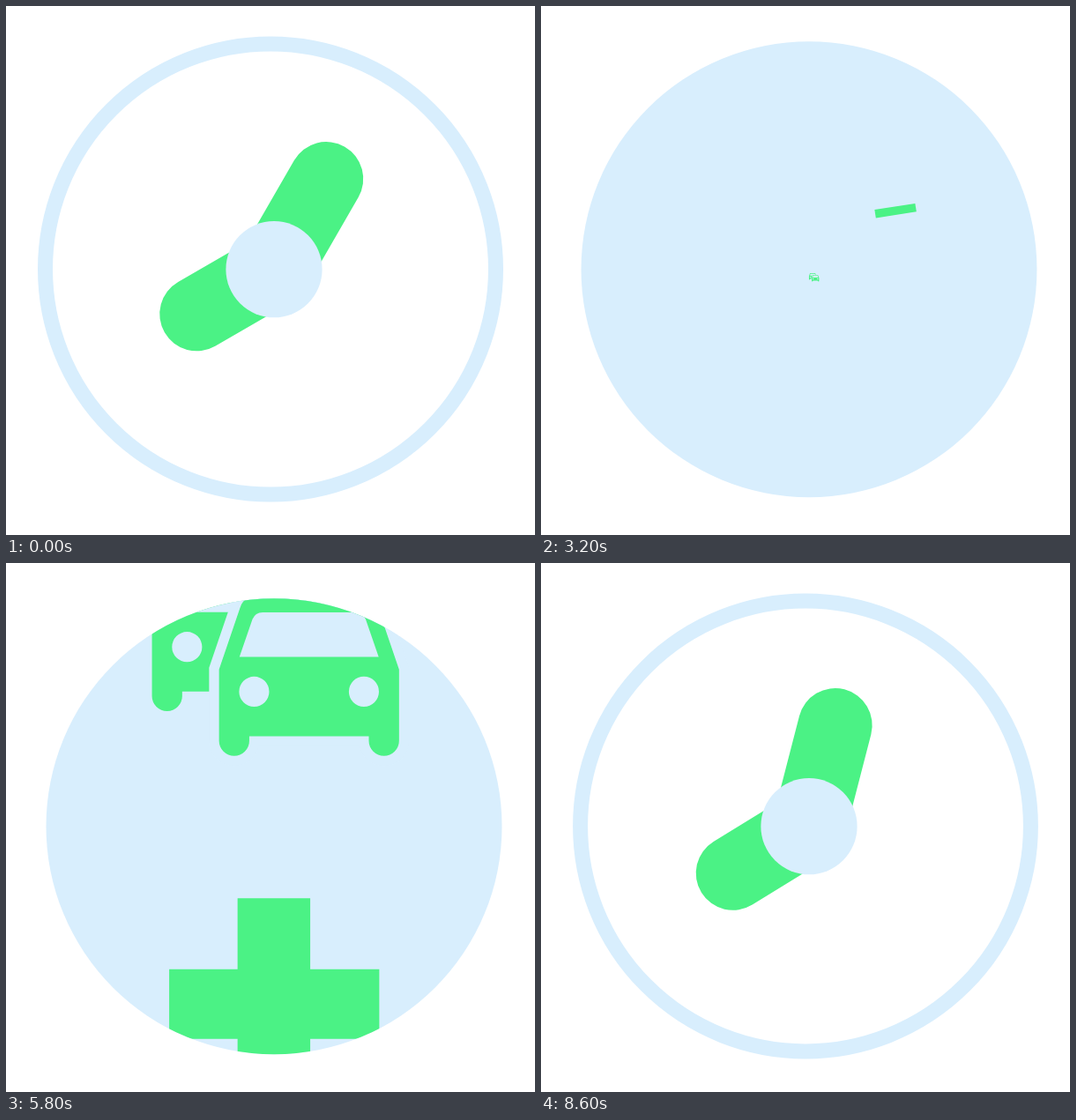
An HTML page with a canvas that plays this animation: 600 px wide and 600 px high, repeating every 8.7 s.

```html
<!DOCTYPE html>
<html lang="en">
<head>
<meta charset="utf-8">
<title>Clock, pulse, cars, cross</title>
<style>
  html, body { margin: 0; height: 100%; overflow: hidden; background: #fff; }
  canvas { display: block; width: 100vw; height: 100vh; }
</style>
</head>
<body>
<canvas width="600" height="600"></canvas>
<script>
const ctx = document.querySelector('canvas').getContext('2d');
const LOOP = 8700, STEP = 100;
const BLUE = '#d8eefd', GREEN = '#4bf285';
const CX = 304, CY = 298.7, KNOB = 54.6, DISC = 258.5;

const pulse = new Path2D(`M178.5 289.5H229L252 262L283.5 325L320.5 183L355 292L375 251L391 289.5H423.5
  V310H377L374 303L351 349L322.5 259L289.5 384L247.5 299L238.5 310H178.5Z`);
const carBody = new Path2D(`M245 320L267.5 254Q271 242 283 242H401Q413 242 416.5 254L439 320V397
  A16.3 16.3 0 0 1 406.4 397V392H277.6V397A16.3 16.3 0 0 1 245 397Z`);
const carHoles = new Path2D(`M267 306.5L281 266Q284 258.5 292 258.5H392Q400 258.5 403 266L417 306.5Z
  M299 344A16.2 16.2 0 1 1 266.6 344A16.2 16.2 0 1 1 299 344Z
  M417.3 344A16.2 16.2 0 1 1 384.9 344A16.2 16.2 0 1 1 417.3 344Z`);
const cross = new Path2D('M260 172.7H347.7V258.3H431V342.3H347.7V424H260V342.3H177.5V258.3H260Z');

// Piecewise linear value through [time, value] points.
function track(t, points) {
  if (t <= points[0][0]) return points[0][1];
  for (let i = 1; i < points.length; i++) {
    const [t0, v0] = points[i - 1], [t1, v1] = points[i];
    if (t <= t1) return v0 + (v1 - v0) * (t - t0) / (t1 - t0);
  }
  return points[points.length - 1][1];
}

const smooth = p => p * p * (3 - 2 * p);
const settle = (t, start, tau) => t < start ? 0 : 1 - Math.exp((start - t) / tau);

function scaled(x, y, s, draw) {
  if (s <= 0) return;
  ctx.save();
  ctx.translate(x, y);
  ctx.scale(s, s);
  ctx.translate(-x, -y);
  draw();
  ctx.restore();
}

function fill(path, color) {
  ctx.fillStyle = color;
  ctx.fill(path);
}

function circle(x, y, r) {
  ctx.beginPath();
  ctx.arc(x, y, r, 0, 2 * Math.PI);
}

function line(x0, y0, x1, y1, width, cap = 'butt') {
  ctx.beginPath();
  ctx.moveTo(x0, y0);
  ctx.lineTo(x1, y1);
  ctx.lineWidth = width;
  ctx.lineCap = cap;
  ctx.strokeStyle = GREEN;
  ctx.stroke();
}

function hand(degrees, length) {
  const a = degrees * Math.PI / 180;
  line(CX, CY, CX + length * Math.sin(a), CY - length * Math.cos(a), 84, 'round');
}

function drawClock(t) {
  hand(track(t, [[-1200, 225], [-100, 238.4], [0, 240], [900, 259.8], [1800, 275]]), 101.3);
  hand(track(t, [[-200, 0], [-100, 14.5], [0, 30], [200, 50], [500, 61.5], [900, 60]]), 118.5);
  const ringScale = t < 0 ? settle(t, -1300, 150) : 1 - settle(t, 950, 150);
  scaled(300, 298.5, ringScale, () => {
    circle(300, 298.5, 255.5);
    ctx.lineWidth = 17;
    ctx.strokeStyle = BLUE;
    ctx.stroke();
  });
}

function drawCar() {
  fill(carBody, GREEN);
  fill(carHoles, BLUE);
}

function drawCrash(t) {
  const zoom = track(t, [[3200, 0.86], [5100, 1], [6300, 1.09]]);
  const pop = track(t, [[3100, 0], [3200, 0.05], [3300, 0.55], [3400, 0.85], [3600, 1]]);
  scaled(309, 308, zoom, () => {
    scaled(310, 308, pop, () => {
      ctx.save();
      ctx.translate(-72.3, -48.2);
      drawCar();
      ctx.restore();
      ctx.lineWidth = 21.5;
      ctx.strokeStyle = BLUE;
      ctx.stroke(carBody);
      fill(carBody, BLUE);
      drawCar();
    });
    if (t >= 3200) line(390.5, 224, 444, 215.7, 11);
    if (t >= 3300) line(384, 209.5, 417.5, 167.5, 12);
    if (t >= 3400) line(366.5, 205.5, 367.6, 150, 11.5);
  });
}

function drawIcons(t) {
  const pulseScale = track(t, [[1200, 0], [1500, 0.75], [2000, 1], [2800, 1.42], [3100, 0]]);
  scaled(301.3, 283, pulseScale, () => fill(pulse, GREEN));

  const slide = smooth(track(t, [[5400, 0], [6200, 1]]));
  if (t >= 3200 && slide < 1) {
    ctx.save();
    ctx.translate(0, -400 * slide);
    drawCrash(t);
    ctx.restore();
  }
  if (slide > 0) {
    ctx.translate(0, 400 * (1 - slide));
    const crossScale = track(t, [[5400, 0.92], [7000, 1], [7200, 1.008], [7500, 0]]);
    scaled(CX, CY, crossScale, () => fill(cross, GREEN));
  }
}

function draw(t) {
  ctx.fillStyle = '#fff';
  ctx.fillRect(0, 0, 600, 600);
  if (t < 1900) drawClock(t);
  if (t >= 7300) drawClock(t - LOOP);

  const open = t < 7200 ? settle(t, 1000, 256) : 1 - settle(t, 7200, 150);
  circle(CX, CY, KNOB + (DISC - KNOB) * open);
  ctx.fillStyle = BLUE;
  ctx.fill();

  ctx.save();
  ctx.clip();
  drawIcons(t);
  ctx.restore();
}

const start = performance.now();
function tick() {
  const t = (performance.now() - start) % LOOP;
  draw(Math.floor(t / STEP) * STEP);
  requestAnimationFrame(tick);
}
tick();
</script>
</body>
</html>
```
